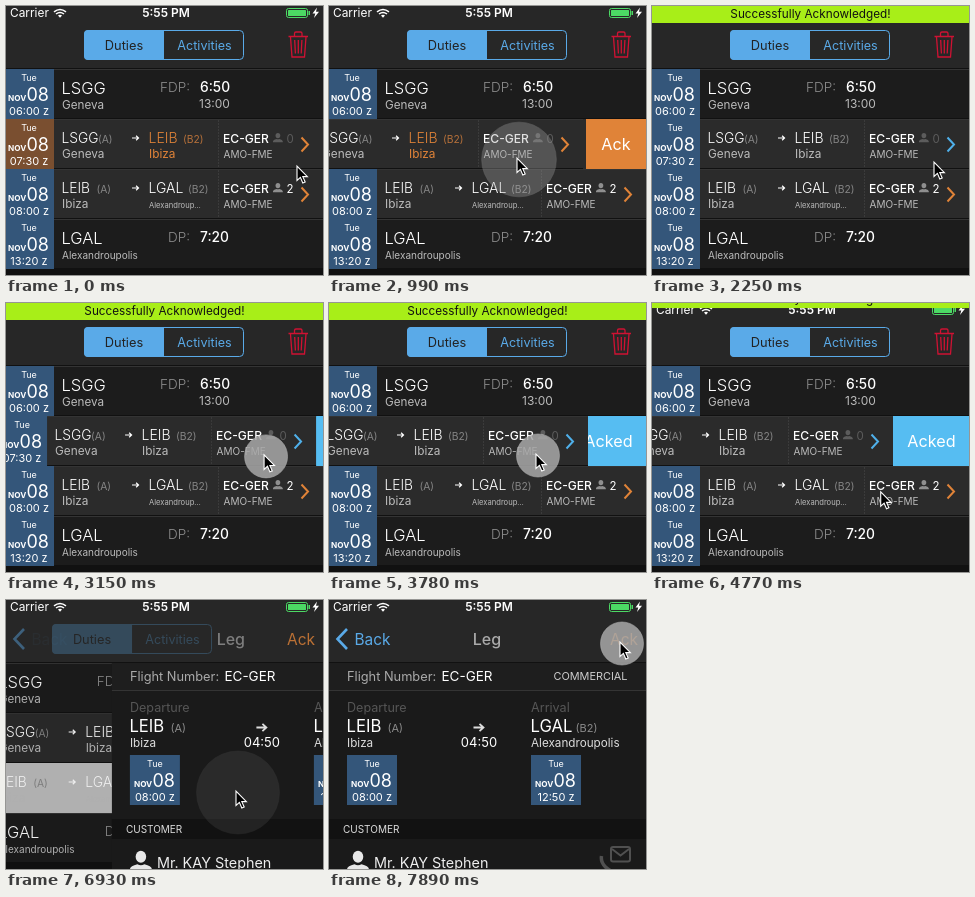
These frames come from a looping animation (317x269 px, 8 s). An HTML page:

```html
<!DOCTYPE html>
<html lang="en">
<head>
<meta charset="utf-8">
<title>Duties</title>
<style>
html, body { margin: 0; width: 100%; height: 100%; overflow: hidden; background: #111; }
svg { display: block; width: 100vw; height: 100vh; }
text { font-family: Inter, Roboto, "Liberation Sans", sans-serif; white-space: pre; }
</style>
</head>
<body>
<svg id="stage" viewBox="0 0 317 269"></svg>
<script>
const LOOP = 8000, W = 317;
const BLUE = '#5aaae8', ORANGE = '#e08338', DATE = '#34567a', BROWN = '#7a4f30', PANEL = '#2b2b2b';

// Markup helpers
const text = (x, y, size, str, fill = '#fff', weight = 400, anchor = 'start') =>
  `<text x="${x}" y="${y}" font-size="${size}" fill="${fill}" font-weight="${weight}" text-anchor="${anchor}">${str}</text>`;
const rect = (x, y, w, h, fill, extra = '') =>
  `<rect x="${x}" y="${y}" width="${w}" height="${h}" fill="${fill}" ${extra}/>`;
const line = (d, stroke, width = 1, extra = '') =>
  `<path d="${d}" fill="none" stroke="${stroke}" stroke-width="${width}" ${extra}/>`;
const shape = (d, fill) => `<path d="${d}" fill="${fill}"/>`;
const group = (id, body, extra = '') => `<g id="${id}" ${extra}>${body}</g>`;

const person = (x, y, s, fill) =>
  `<g transform="translate(${x} ${y}) scale(${s})">` +
  `<ellipse cx="5" cy="2.6" rx="2.4" ry="2.7" fill="${fill}"/>` +
  shape('M0 9.5V8.4Q0 6.8 3.4 6Q5 7 6.6 6Q10 6.8 10 8.4V9.5Z', fill) + '</g>';

const dateCell = (x, y, w, time, fill) => {
  const mid = x + w / 2 - (w < 50 ? 1 : 0);
  return rect(x, y, w, 50, fill) +
    text(mid, y + 12, 9, 'Tue', '#fff', 400, 'middle') +
    text(mid - 21, y + 32, 8.2, 'NOV', '#fff', 700) +
    text(mid - 2.5, y + 32, 18, '08') +
    text(mid, y + 46, 11, time, '#fff', 400, 'middle');
};

const edge = y => rect(0, y + 49, W, 1, '#111') + rect(0, y, W, 1, '#343434');

function endRow(y, time, code, city, citySize, label, value, below) {
  return rect(0, y, W, 50, '#1c1c1c') + edge(y) + dateCell(0, y, 48, time, DATE) +
    text(55.5, y + 25, 16.5, code, '#fff', 300) +
    text(56, y + 40, citySize, city, '#bbb') +
    text(184, y + 23, 13.5, label, '#8e8e8e', 300, 'end') +
    text(194, y + 23, 13.8, value, '#fff', 500) +
    text(193, y + 39, 12, below, '#bbb');
}

function legRow(y, o) {
  const main = o.pending ? ORANGE : '#fff';
  const sub = o.pending ? ORANGE : '#bbb';
  const bg = o.selected ? '#bcbcbc' : PANEL;
  return rect(0, y, W, 50, bg) + (o.selected ? '' : edge(y)) +
    dateCell(0, y, 48, o.time, o.selected ? 'none' : o.pending ? BROWN : DATE) +
    line(`M212.5 ${y + 1}v48`, o.selected ? '#aaa' : '#3b3b3b', 1, 'stroke-dasharray="2 1"') +
    text(55.5, y + 24, 13.8, o.from, '#fff', 300) +
    text(o.from === 'LSGG' ? 92 : 90.5, y + 23.5, 10.3, '(A)', '#858585') +
    text(56, y + 39, 11.8, o.fromCity, '#bbb') +
    line(`M126 ${y + 19}h6.5m-2.4 -2.2l2.4 2.2l-2.4 2.2`, '#fff', 1.2) +
    text(142.5, y + 24, 14, o.to, main, 300) +
    text(o.to === 'LEIB' ? 177 : 182, y + 23.5, 10.3, '(B2)', o.pending ? '#b5703a' : '#858585') +
    text(143, y + 39, o.toSize, o.toCity, sub) +
    text(217, y + 23.5, 12.1, 'EC-GER', '#fff', 500) +
    text(217.5, y + 38.5, 10, 'AMO-FME', '#bbb') +
    person(267, y + 14, 0.98, o.seats === '0' ? '#5c5c5c' : '#8f8f8f') +
    text(280.5, y + 23.5, 11.5, o.seats, o.seats === '0' ? '#5c5c5c' : '#fff') +
    line(`M295.5 ${y + 18.5}l6.5 7l-6.5 7`, o.chevron, 2);
}

const first = { time: '07:30 z', from: 'LSGG', fromCity: 'Geneva', to: 'LEIB', toCity: 'Ibiza', toSize: 11.8, seats: '0' };
const second = { time: '08:00 z', from: 'LEIB', fromCity: 'Ibiza', to: 'LGAL', toCity: 'Alexandroup…', toSize: 7.6, seats: '2', chevron: ORANGE };

const swipeButton = (id, w, label, fill) =>
  group(id, rect(W - w, 113, w, 50, fill) + text(W - w / 2 + (w > 60 ? 0.5 : 0), 144, 16.2, label, '#fff', 400, 'middle'));

const list =
  rect(0, 62, W, 207, '#111') +
  endRow(63, '06:00 z', 'LSGG', 'Geneva', 11.7, 'FDP:', '6:50', '13:00') +
  rect(0, 113, W, 50, PANEL) +
  swipeButton('ackButton', 60, 'Ack', ORANGE) +
  swipeButton('ackedButton', 76, 'Acked', '#56bdf2') +
  group('swipe',
    group('pending', legRow(113, { ...first, pending: true, chevron: ORANGE })) +
    group('acked', legRow(113, { ...first, chevron: '#4fb0ea' }))) +
  group('idle', legRow(163, second)) +
  group('selected', legRow(163, { ...second, selected: true })) +
  endRow(213, '13:20 z', 'LGAL', 'Alexandroupolis', 10, 'DP:', '7:20', '');

const place = (x, label, code, tag, tagX, city, time) =>
  text(x, 112, 12.6, label, '#565656') +
  text(x - 0.5, 132, 16.7, code) +
  text(tagX, 131.5, 11, tag, '#8a8a8a') +
  text(x, 147, 11.7, city, '#ddd') +
  dateCell(x, 155, 50, time, DATE);

const detail =
  rect(0, 62, W, 207, '#1a1a1a') +
  rect(0, 62, W, 29, '#1e1e1e') + rect(0, 90, W, 1, '#343434') +
  text(18, 81, 12.8, 'Flight Number:', '#aaa') +
  text(112.5, 81, 13.5, 'EC-GER') +
  text(298.5, 80, 10.9, 'COMMERCIAL', '#ccc', 400, 'end') +
  place(18, 'Departure', 'LEIB', '(A)', 58.5, 'Ibiza', '08:00 z') +
  place(202, 'Arrival', 'LGAL', '(B2)', 246.5, 'Alexandroupolis', '12:50 z') +
  line('M144.5 127.5h10m-4 -3.7l4 3.7l-4 3.7', '#ddd', 1.8) +
  text(150, 147, 13, '04:50', '#fff', 400, 'middle') +
  rect(0, 219, W, 20, '#121212') +
  text(14, 233, 10, 'CUSTOMER', '#ddd') +
  person(18, 251, 2.2, '#e8e8e8') +
  text(45, 268, 14.4, 'Mr. KAY Stephen', '#eee') +
  rect(282, 247, 19, 14.5, 'none', 'rx="2" stroke="#505050" stroke-width="2"') +
  line('M283 249l8.5 6.5l8.5 -6.5', '#505050', 2) +
  line('M272.5 256q-1 6 4 11t11 5', '#505050', 3.5);

const status =
  text(4, 11, 11.9, 'Carrier') +
  line('M48 5.8q6 -4.8 12 0M50 8q4 -3.2 8 0', '#fff', 1.5) +
  shape('M52 9.6q2 -1.6 4 0l-2 2.2Z', '#fff') +
  text(160, 11, 12, '5:55 PM', '#fff', 600, 'middle') +
  rect(280.5, 2.5, 21, 9, 'none', 'rx="2" stroke="#4cd964"') +
  rect(282, 4, 18, 6, '#4cd964', 'rx="0.5"') +
  rect(302.5, 5, 1.5, 4, '#4cd964') +
  shape('M311 1.5L306.5 7.5H309.3L308 12L313 5.8H310Z', '#fff');

const segments =
  rect(78.5, 24.5, 159, 29, 'none', `rx="4" stroke="${BLUE}"`) +
  shape('M158 24V54H82Q78 54 78 50V28Q78 24 82 24Z', BLUE) +
  text(118, 44, 12.8, 'Duties', '#222', 400, 'middle') +
  text(198.5, 44, 12.6, 'Activities', BLUE, 400, 'middle');

const trash = line(
  'M282.5 30.5H302M288.5 30V27.5Q288.5 26 290 26H294.5Q296 26 296 27.5V30' +
  'M284.5 31L286 51H298.5L300 31M288.7 34L289.4 47.5M292.3 34V47.5M295.9 34L295.2 47.5', '#cf1233', 1.3);

document.getElementById('stage').innerHTML =
  rect(0, 0, W, 269, '#111') +
  group('list', list + rect(0, 62, W, 207, '#000', 'id="dim"')) +
  group('detail', detail) +
  rect(0, 0, W, 62, '#272727') + rect(0, 62, W, 1, '#111') +
  group('segments', segments) + group('trash', trash) +
  group('back', line('M18 29L8.5 39L18 49', BLUE, 2.6)) +
  group('backLabel', text(25.5, 45, 15.4, 'Back', BLUE)) +
  group('leg', text(158, 45, 16, 'Leg', '#aaa', 500, 'middle')) +
  group('ack', text(281, 45, 15.5, 'Ack', ORANGE)) +
  status +
  group('banner', rect(0, 0, W, 17, '#a8ee18') +
    text(158.5, 11.5, 11.75, 'Successfully Acknowledged!', '#111', 400, 'middle')) +
  '<circle id="touch" fill="#a8a8a8" stroke="#c4c4c4" stroke-width="0.6"/>' +
  group('cursor', '<path d="M0 0V14.5L3.4 11.4L5.8 17L8.2 16L5.8 10.6H10.4Z" fill="#000" stroke="#fff" stroke-width="1.1"/>');

// Motion
const el = {};
document.querySelectorAll('[id]').forEach(n => el[n.id] = n);

const clamp = v => Math.max(0, Math.min(1, v));
const smooth = u => u * u * (3 - 2 * u);

function track(keys, t) {
  let i = keys.findIndex(k => k[0] > t);
  if (i === 0) return keys[0].slice(1);
  if (i < 0) return keys[keys.length - 1].slice(1);
  const a = keys[i - 1], b = keys[i], u = smooth((t - a[0]) / (b[0] - a[0]));
  return a.slice(1).map((v, k) => v + (b[k + 1] - v) * u);
}

const cursorPath = [
  [0, 291, 160], [380, 251, 153], [450, 251, 153], [850, 188, 152], [1150, 188, 152],
  [1550, 290, 151], [2000, 290, 151], [2220, 282, 156], [2500, 282, 156], [2750, 265, 152],
  [3000, 265, 152], [3700, 207, 151], [4300, 207, 151], [4850, 230, 191], [7180, 230, 191], [7660, 291, 42]
];
const swipePath = [
  [450, 0], [850, -63], [1000, -63], [1150, -60], [1780, -60], [2080, 0], [3000, 0],
  [3700, -58], [3960, -58], [4200, -76], [5540, -76], [5740, 0]
];
const bannerPath = [[1900, -18], [2150, 0], [4600, 0], [4880, -18]];
const presses = [[400, 860], [1690, 1780], [2850, 3940], [5400, 5520], [6100, 6710], [7880, 9000]];
const FADE = 350;

const move = (node, x, y = 0) => node.setAttribute('transform', `translate(${x.toFixed(2)} ${y.toFixed(2)})`);
const show = (node, on) => node.setAttribute('display', on ? 'inline' : 'none');
const fade = (node, a) => node.setAttribute('opacity', clamp(a).toFixed(3));

function drawTouch(t, x, y) {
  const press = presses.find(([down, up]) => t >= down && t < up + FADE);
  show(el.touch, press);
  if (!press) return;
  const u = clamp((t - press[1]) / FADE);
  el.touch.setAttribute('cx', x + 2);
  el.touch.setAttribute('cy', y + 1.5);
  el.touch.setAttribute('r', 21.5 + 21 * (1 - (1 - u) ** 3));
  fade(el.touch, 0.85 * (1 - u) ** 2);
}

function draw(t) {
  const [x, y] = track(cursorPath, t);
  const [slide] = track(swipePath, t);
  const [drop] = track(bannerPath, t);
  const push = 1 - (1 - clamp((t - 6720) / 500)) ** 2;
  const acked = t >= 2050, picked = t >= 6280;

  move(el.cursor, x, y);
  drawTouch(t, x, y);
  move(el.swipe, slide);
  move(el.banner, 0, drop);
  show(el.pending, !acked);
  show(el.acked, acked);
  show(el.ackButton, slide < 0 && t < 2090);
  show(el.ackedButton, slide < 0 && t >= 2090);
  show(el.idle, !picked);
  show(el.selected, picked);

  move(el.list, -0.3 * W * push);
  move(el.detail, W * (1 - push));
  fade(el.dim, 0.1 * push);
  move(el.segments, -48 * push);
  fade(el.segments, 1 - push * 1.1);
  fade(el.trash, 1 - push * 2);
  fade(el.back, push ** 2);
  fade(el.backLabel, (push - 0.65) / 0.35);
  move(el.leg, 200 * (1 - push));
  fade(el.leg, push);
  fade(el.ack, push * 1.2);
}

const start = performance.now();
function tick() {
  draw((performance.now() - start) % LOOP);
  requestAnimationFrame(tick);
}
tick();
</script>
</body>
</html>
```
